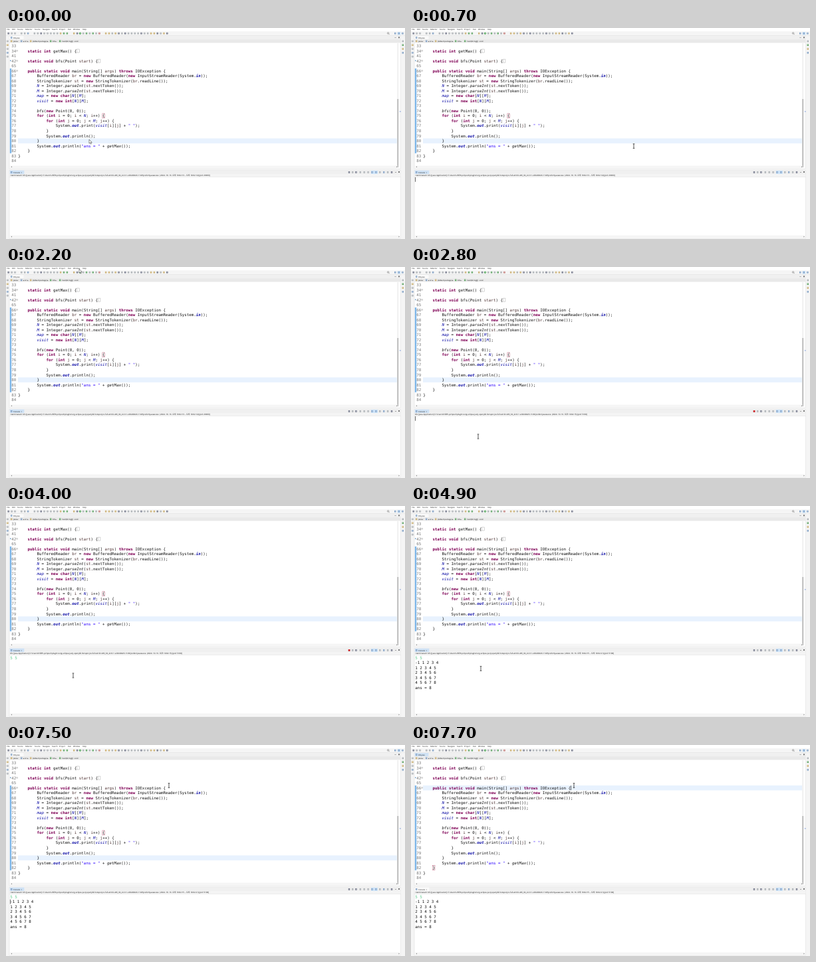
An HTML page for the animation above (8000 ms loop, 600 px wide and 318 px high).

```html
<!DOCTYPE html>
<html lang="en">
<head>
<meta charset="utf-8">
<title>Breadth-first search in an editor</title>
<style>
html, body { margin: 0; width: 100%; height: 100%; overflow: hidden; background: #fff; }
svg { display: block; width: 100vw; height: 100vh; }
text { white-space: pre; text-rendering: geometricPrecision; }
.code { font: 5.85px "DejaVu Sans Mono", monospace; fill: #111; }
.ui { font: 2.7px "Open Sans", "Noto Sans CJK KR", sans-serif; fill: #111; }
.status { font-size: 2.95px; }
.num { fill: #787878; }
.kw { fill: #7f0055; font-weight: bold; }
.str { fill: #2a00ff; }
.var { fill: #4d3030; }
.field { fill: #0a0aa4; font-style: italic; }
.const { fill: #0a0aa4; font-style: italic; font-weight: bold; }
.call { font-style: italic; }
.typed { fill: #5cc88c; }

[class*="t-"] { opacity: 0; animation: 8s step-end infinite; }
.t-early { animation-name: early; }
.t-late { animation-name: late; }
.t-past { animation-name: past; }
.t-run { animation-name: run; }
.t-done { animation-name: done; }
.t-key1 { animation-name: key1; }
.t-key2 { animation-name: key2; }
.t-out { animation-name: out; }
.t-caret1 { animation-name: caret1; }
.t-caret2 { animation-name: caret2; }
.t-arrow { animation-name: arrow; }
.t-beam { animation-name: beam; }
#mouse { animation: move 8s step-end infinite; }

@keyframes early { 0% { opacity: 1 } 95%, 100% { opacity: 0 } }
@keyframes late { 0% { opacity: 0 } 95%, 100% { opacity: 1 } }
@keyframes past { 0% { opacity: 1 } 31.25%, 100% { opacity: 0 } }
@keyframes run { 0% { opacity: 0 } 31.25% { opacity: 1 } 55%, 100% { opacity: 0 } }
@keyframes done { 0% { opacity: 0 } 55%, 100% { opacity: 1 } }
@keyframes key1 { 0% { opacity: 0 } 48.75%, 100% { opacity: 1 } }
@keyframes key2 { 0% { opacity: 0 } 50%, 100% { opacity: 1 } }
@keyframes out { 0% { opacity: 0 } 52.5%, 100% { opacity: 1 } }
@keyframes caret1 {
  0%, 12.5%, 25%, 41.25%, 100% { opacity: 0 }
  3.75%, 18.75%, 31.25% { opacity: 1 }
}
@keyframes caret2 {
  0%, 58.75%, 72.5%, 85%, 95%, 100% { opacity: 0 }
  52.5%, 67.5%, 78.75%, 92.5% { opacity: 1 }
}
@keyframes arrow { 0%, 21.25% { opacity: 1 } 3.75%, 30%, 100% { opacity: 0 } }
@keyframes beam { 0%, 21.25% { opacity: 0 } 3.75%, 30%, 100% { opacity: 1 } }
@keyframes move {
  0% { transform: translate(125px, 168px) }
  1.25% { transform: translate(125px, 168px); animation-timing-function: steps(4, start) }
  6.25% { transform: translate(339px, 189px) }
  8.75% { transform: translate(335px, 178px) }
  11.25% { transform: translate(329px, 171px) }
  13.75% { transform: translate(329px, 171px); animation-timing-function: steps(7, start) }
  22.5% { transform: translate(113px, 4px) }
  27.5% { transform: translate(110px, 3px) }
  30% { transform: translate(110px, 3px); animation-timing-function: steps(5, start) }
  36.25% { transform: translate(101px, 255.4px) }
  61.25% { transform: translate(105px, 245px) }
  67.5% { transform: translate(105px, 245px); animation-timing-function: steps(3, start) }
  71.25% { transform: translate(257px, 60px); animation-timing-function: steps(4, start) }
  76.25% { transform: translate(121px, 132px) }
  78.75% { transform: translate(121px, 130px) }
  80% { transform: translate(120.5px, 128.5px) }
  83.75% { transform: translate(120.5px, 128.5px); animation-timing-function: steps(4, start) }
  88.75% { transform: translate(187px, 67px) }
  92.5% { transform: translate(187px, 67px); animation-timing-function: steps(2, start) }
  95%, 100% { transform: translate(245px, 61px) }
}
</style>
</head>
<body>
<svg viewBox="0 0 600 318" preserveAspectRatio="none">
  <rect width="600" height="318" fill="#f5f5f5"/>
  <rect width="600" height="5" fill="#fff"/>
  <rect y="11.4" width="600" height=".5" fill="#e3e3e3"/>
  <g id="bars"></g>

  <!-- editor -->
  <rect x="5" y="12" width="588.5" height="200" fill="#fff" stroke="#dcdcdc" stroke-width=".5"/>
  <rect x="5.2" y="12.2" width="588" height="10.3" fill="#f0f0f0"/>
  <rect x="5.5" y="12" width="21" height="5" fill="#fafafa"/>
  <rect class="t-late" x="5.5" y="12" width="21" height="5" fill="#cfe2f5"/>
  <rect x="5.2" y="17.2" width="588" height="5" fill="#e9e9e9"/>
  <rect class="t-early" x="18" y="166.4" width="570" height="7.5" fill="#e8f2fe"/>
  <rect class="t-late" x="18" y="60.9" width="570" height="7.5" fill="#e8f2fe"/>
  <rect x="5.8" y="61" width="2.4" height="127.8" fill="#7db6e8"/>
  <g id="code"></g>
  <g fill="none" stroke-width=".5">
    <rect class="t-early" x="144.9" y="128.9" width="3.7" height="6.9" stroke="#c0607c"/>
    <rect class="t-late" x="32.3" y="181.6" width="3.7" height="6.9" stroke="#c0607c"/>
    <rect x="106.6" y="32" width="3.6" height="5" stroke="#aaa"/>
    <rect x="138.3" y="47.1" width="3.6" height="5" stroke="#aaa"/>
    <circle cx="16.6" cy="34.3" r=".9" stroke="#888"/>
    <circle cx="16.6" cy="49.4" r=".9" stroke="#888"/>
    <circle cx="16.6" cy="64.4" r=".9" stroke="#888"/>
  </g>
  <rect x="6" y="48.4" width="1.6" height="1.6" fill="#7ba7cf"/>
  <rect class="t-late" x="240.3" y="61.3" width=".6" height="6.8"/>
  <rect x="588" y="23" width="2.4" height="184" fill="#f2f2f2"/>
  <rect x="588.7" y="107" width="1.1" height="103" fill="#999"/>
  <rect x="591.6" y="125.4" width="2.4" height="1" fill="#8ba6dc"/>
  <rect x="5.2" y="207.6" width="583" height="3.6" fill="#f5f5f5"/>
  <path d="M9 208.2v2l-1.3-1zM587 208.2v2l1.3-1z" fill="#777"/>

  <!-- console -->
  <rect x="5" y="214.6" width="588.5" height="103" fill="#fff" stroke="#dcdcdc" stroke-width=".5"/>
  <rect x="5.2" y="214.8" width="588" height="5.2" fill="#f0f0f0"/>
  <rect x="5.5" y="214.6" width="22" height="5.4" fill="#fafafa"/>
  <rect class="t-early" x="5.5" y="214.6" width="22" height="5.4" fill="#cfe2f5"/>
  <rect x="549" y="214.9" width="10" height="5" fill="#cfe5fa"/>
  <g id="tools"></g>
  <rect class="t-run" x="514.8" y="216.1" width="2.6" height="2.6" fill="#d22"/>
  <rect x="5.2" y="220" width="588" height="4" fill="#f4f4f4"/>
  <rect x="5.2" y="224" width="588" height=".4" fill="#d0d0d0"/>
  <rect x="5.2" y="312.6" width="588" height="4" fill="#f5f5f5"/>
  <path d="M9 313.5v2l-1.3-1zM590.5 313.5v2l1.3-1z" fill="#777"/>
  <g id="console"></g>
  <rect class="t-caret1" x="6" y="225" width=".6" height="6.8"/>
  <rect class="t-caret2" x="6" y="232.8" width=".6" height="6.8"/>

  <g id="mouse">
    <path class="t-arrow" d="M0 0v6l1.4-1.2 1 2.1 1-.5-1-2h1.9z" fill="#fff" stroke="#222" stroke-width=".5"/>
    <path class="t-beam" d="M-1.3-3.3h2.6M0-3.3v6.6M-1.3 3.3h2.6" fill="none" stroke="#111" stroke-width=".7"/>
  </g>
</svg>

<script>
const PITCH = 7.53, CHAR = 3.522, LEFT = 18.3;
const $ = id => document.getElementById(id);
const esc = s => s.replace(/</g, "&lt;");
const text = (x, y, body, cls) => `<text x="${x}" y="${y}" class="${cls}">${body}</text>`;
const box = (x, y, w, h, fill) => `<rect x="${x}" y="${y}" width="${w}" height="${h}" fill="${fill}"/>`;

const styles = {
  kw: "public static void int new for char throws",
  field: "N M map visit",
  const: "in out",
  call: "parseInt bfs getMax",
  var: "br st i j args start"
};
const styleOf = {};
for (const [cls, words] of Object.entries(styles))
  for (const w of words.split(" ")) styleOf[w] = cls;

function paint(line) {
  return esc(line).replace(/"[^"]*"|(?:int getMax|void bfs)\b|\w+/g, word => {
    const pair = word[0] !== '"' && word.split(" ");
    if (pair && pair[1]) return `<tspan class="kw">${pair[0]}</tspan> ${pair[1]}`;
    const cls = word[0] === '"' ? "str" : styleOf[word];
    return cls ? `<tspan class="${cls}">${word}</tspan>` : word;
  });
}

const source = `33
34    static int getMax() {
41
42    static void bfs(Point start) {
65
66    public static void main(String[] args) throws IOException {
67        BufferedReader br = new BufferedReader(new InputStreamReader(System.in));
68        StringTokenizer st = new StringTokenizer(br.readLine());
69        N = Integer.parseInt(st.nextToken());
70        M = Integer.parseInt(st.nextToken());
71        map = new char[N][M];
72        visit = new int[N][M];
73
74        bfs(new Point(0, 0));
75        for (int i = 0; i < N; i++) {
76            for (int j = 0; j < M; j++) {
77                System.out.print(visit[i][j] + " ");
78            }
79            System.out.println();
80        }
81        System.out.println("ans = " + getMax());
82    }
83}
84`;
$("code").innerHTML = source.split("\n").map((row, i) => {
  const y = 29 + i * PITCH, line = row.slice(2), body = line.trimStart();
  const x = LEFT + (line.length - body.length) * CHAR;
  return text(8.3, y, row.slice(0, 2), "code num") + text(x, y, paint(body), "code");
}).join("");

const output = ["-1 1 2 3 4", "1 2 3 4 5", "2 3 4 5 6", "3 4 5 6 7", "4 5 6 7 8", "ans = 8"];
const path = "C:\\Users\\USER\\.p2\\pool\\plugins\\org.eclipse.justj.openjdk.hotspot.jre.full.win32.x86_64_22.0.1.v20240426-1149\\jre\\bin\\javaw.exe";
const app = "bfs [Java Application]", day = "(2024. 10. 16. 오후 10:02:";
const status = (cls, head, when) =>
  text(6, 223, esc(`${head} ${path}  ${day}${when}`), "ui status " + cls);
$("console").innerHTML =
  status("t-past", "<terminated> " + app, "13 – 오후 10:02:14) [pid: 28960]") +
  status("t-run", app, "15) [pid: 5108]") +
  status("t-done", "<terminated> " + app, "15 – 오후 10:02:21) [pid: 5108]") +
  text(6.2, 230.7, "5", "code typed t-key1") +
  text(6.2 + 2 * CHAR, 230.7, "5", "code typed t-key2") +
  '<g class="t-out">' +
  output.map((s, i) => text(6.2, 238.3 + i * PITCH, s, "code")).join("") + "</g>";

// Small toolbar icons: one letter each picks a colour, a dot leaves a gap.
const hues = { g: "#9da3a8", b: "#6f93bd", y: "#c4a45a", n: "#4a9a50", r: "#b9605c", d: "#5b6077" };
const icons = (row, x, y, step) => [...row].map((c, i) => hues[c]
  ? box(x + i * step, y, 2.4, 2.6, hues[c]) + box(x + i * step + .7, y + .7, 1, 1, "#f8f8f8") : "").join("");
const column = (row, x, y) => [...row].map((c, i) => icons(c, x, y + i * 5.8, 0)).join("");

const menu = { File: 1.5, Edit: 9, Source: 17, Refactor: 29, Search: 69, Project: 80, Run: 93, Window: 101, Help: 115 };
$("bars").innerHTML =
  Object.entries(menu).map(([s, x]) => text(x, 3.4, s, "ui")).join("") +
  text(43, 3.4, "Source", "ui") + text(55, 3.4, "Navigate", "ui") +
  icons("dgg.ggb.ggdgggggynn", 2.5, 6.8, 4.9) + icons("yd", 101, 6.8, 4.9) +
  '<circle cx="111.5" cy="8.1" r="1.7" fill="#3f9d48"/><path d="M111 7.2v1.8l1.5-.9z" fill="#fff"/>' +
  icons("gngngr.yygydgdggggdggyydgyd", 115, 6.8, 4.85) +
  '<circle cx="574.6" cy="7.8" r="1.2" fill="none" stroke="#555" stroke-width=".5"/><path d="M575.5 8.7l1.2 1.2" stroke="#555" stroke-width=".5"/>' +
  box(588.5, 6, 5, 4.5, "#cfe5fa") + icons("bbb", 584, 6.8, 5.6) +
  column("gygbg", 1.2, 18.6) + column("gnyb", 595.6, 18.6);

$("tools").innerHTML =
  icons("dgd", 514.8, 216.1, 5.2) + icons("gggbbgbgd", 531.6, 216.1, 5.9) +
  box(585, 217, 2, .5, "#555") + box(590, 216, 2, 2, "#777") +
  box(584.5, 14, 2, .5, "#555") + box(590, 13.3, 2, 2, "#777") +
  icons("b", 7, 13.2, 0) + text(11, 15.6, "bfs.java", "ui") +
  icons("b", 7, 216.1, 0) + text(11, 218.6, "Console  ×", "ui") +
  icons("y", 7, 18.5, 0) + text(11, 20.8, "java ▸", "ui") + icons("b", 22, 18.5, 0) +
  text(26, 20.8, "▸ src ▸", "ui") + icons("y", 36, 18.5, 0) +
  text(40, 20.8, "(default package) ▸", "ui") + icons("n", 66, 18.5, 0) +
  text(70, 20.8, "bfs ▸", "ui") + icons("n", 80, 18.5, 0) + text(84, 20.8, "main(String[]) : void", "ui");
</script>
</body>
</html>
```
